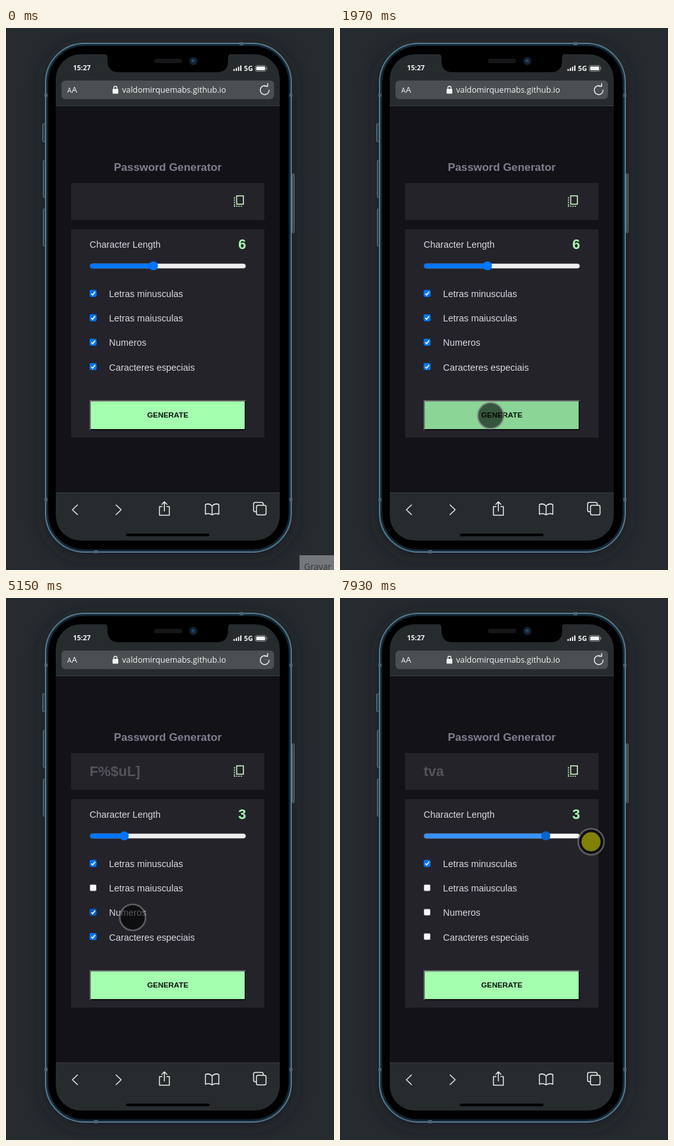
An HTML page that plays this animation: 514 by 846 pixels, repeating every 8 s.

```html
<!DOCTYPE html>
<html lang="pt">
<head>
<meta charset="utf-8">
<title>Password Generator</title>
<style>
html, body { margin: 0; width: 100%; height: 100%; overflow: hidden; background: #262b2f; }
svg { display: block; }
.ui { font-family: "Open Sans", "Noto Sans", sans-serif; fill: #f4f5f5; }
.app { font-family: "Liberation Sans", Arial, sans-serif; font-size: 14.4px; fill: #d9d8df; }
.b { font-weight: 700; }
.big { font-size: 22px; }
.icon { fill: none; stroke: #e9ebec; stroke-width: 1.5; stroke-linecap: round; stroke-linejoin: round; }
</style>
</head>
<body>
<svg width="514" height="846" viewBox="0 0 514 846">
  <defs>
    <filter id="blur" x="-30%" y="-30%" width="160%" height="160%"><feGaussianBlur stdDeviation="14"/></filter>
    <clipPath id="screen"><rect x="78" y="41" width="351" height="759" rx="39"/></clipPath>
  </defs>

  <rect width="514" height="846" fill="#262b2f"/>
  <rect x="58" y="26" width="394" height="800" rx="64" fill="#15191c" opacity=".6" filter="url(#blur)"/>

  <g id="phone">
    <g fill="#2a3b46" stroke="#66808f">
      <rect x="57.5" y="149.5" width="4" height="28" rx="1"/>
      <rect x="58.5" y="206.5" width="3" height="58" rx="1"/>
      <rect x="58.5" y="282.5" width="3" height="58" rx="1"/>
      <rect x="448.5" y="227.5" width="3" height="92" rx="1"/>
    </g>
    <rect x="62" y="24" width="385" height="794" rx="61" fill="#172a37" stroke="#547a8f" stroke-width="2"/>
    <rect x="66" y="28" width="377" height="786" rx="57" stroke="#0b141b"/>
    <path d="M60 105h5M444 105h5M60 736h5M444 736h5M366 24.5h6M138 817.5h6" stroke="#4a6373" stroke-width="5"/>
    <g clip-path="url(#screen)">
      <rect x="78" y="41" width="351" height="759" fill="#262b2e"/>
      <rect x="78" y="121" width="351" height="604" fill="#131217"/>
      <path d="M78 121.5H429M78 725.5H429" stroke="#383c40"/>
      <path d="M154 40Q159 41 159 47V51Q159 69 177 69H330Q348 69 348 51V47Q348 41 353 40Z"/>
    </g>
    <rect x="232" y="48" width="44" height="7" rx="3.5" fill="#151618"/>
    <circle cx="293.5" cy="51.5" r="6.5" fill="#13202c"/>
    <circle cx="293.5" cy="51.5" r="3" fill="#1c3a56"/>
    <circle cx="292.5" cy="50.5" r="1" fill="#3f6e96"/>
  </g>

  <g class="ui">
    <text class="b" x="105" y="66" font-size="10.8">15:27</text>
    <text class="b" x="373" y="66.5" font-size="10.8">5G</text>
    <path d="M357.5 67v-3M361 67v-4.500M364.5 67v-6.500M368 67v-8.500" stroke="#f4f5f5" stroke-width="2"/>
    <rect x="390.5" y="58.5" width="17" height="9" rx="2.5" fill="none" stroke="#8f9396"/>
    <rect x="392" y="60" width="14" height="6" rx="1.5"/>
    <path d="M409 61.5v3" stroke="#8f9396"/>

    <rect x="87" y="82" width="333" height="29" rx="6" fill="#4a4f52"/>
    <text x="96" y="101" font-size="10.5">A</text><text x="103" y="101" font-size="13.5">A</text>
    <rect x="167" y="95" width="9" height="7.5" rx="1.2"/>
    <path d="M169 95V93.5a2.5 2.5 0 0 1 5 0V95" fill="none" stroke="#f4f5f5" stroke-width="1.3"/>
    <text x="182" y="101" font-size="12.7">valdomirquemabs.github.io</text>
  </g>

  <g class="icon">
    <path d="M409.5 91.3A7 7 0 1 0 412.4 97M405.5 90.8H410V86.8"/>
    <path d="M112 744.5l-8 7.5l8 7.5M172.500 744.5l8 7.5l-8 7.5"/>
    <path d="M244.5 747H240.5V760.5H256V747H252M248.2 754V740M244.2 743.5l4-4l4 4"/>
    <path d="M323 746Q318 741 312.5 744V759Q318 756.5 323 760Q328 756.5 333.5 759V744Q328 741 323 746V760"/>
    <path d="M392 755H390.5Q388 755 388 752.5V743Q388 740.5 390.5 740.5H400.5Q403 740.5 403 743V744.5"/>
    <rect x="392.5" y="745" width="15" height="15" rx="2.5"/>
  </g>
  <path d="M190 791.3H317" stroke="#000" stroke-width="4" stroke-linecap="round"/>

  <g class="app">
    <text class="b" x="253.5" y="223" text-anchor="middle" font-size="17.3" fill="#817d92">Password Generator</text>
    <rect x="102" y="242" width="303" height="57.5" fill="#24232a"/>
    <rect x="102" y="314" width="303" height="325.5" fill="#24232a"/>
    <text class="b big" id="pass" x="131" y="278" fill="#54535a"></text>
    <g fill="none" stroke="#c9f0bf" stroke-width="1.6">
      <rect x="361.5" y="262" width="10.5" height="13"/>
      <path d="M358 264V279M357 278.3H370" stroke-dasharray="2 1.6"/>
    </g>
    <text x="131" y="343">Character Length</text>
    <text class="b big" id="count" x="364" y="345" fill="#a4ffaf"></text>

    <rect x="132" y="368" width="243.5" height="7" rx="3.5" id="track" stroke="#c4c4c6" stroke-width=".5"/>
    <rect x="131.5" y="367.7" height="7.6" rx="3.8" id="fill"/>
    <circle id="thumb" cy="371.3" r="7"/>

    <g id="rows"></g>

    <rect id="btn" x="131" y="581" width="245" height="47"/>
    <path id="edgeA" d="M131 628V581H376l-2 2H133V626Z"/>
    <path id="edgeB" d="M376 581V628H131l2-2H374V583Z"/>
    <text class="b" x="253.5" y="608" text-anchor="middle" font-size="11.8" fill="#08110a">GENERATE</text>
  </g>

  <g id="tip" class="ui">
    <rect x="460" y="823" width="54" height="23" fill="#74787b"/>
    <text x="467" y="846" font-size="13.7" fill="#32383b">Gravar</text>
  </g>

  <g id="cursor">
    <circle r="20" fill-opacity=".6"/>
    <circle r="20.2" fill="none" stroke="#85858a" stroke-opacity=".62" stroke-width="2.6"/>
    <circle id="dot" r="15" fill="#ff0" fill-opacity=".48"/>
  </g>
</svg>
<script>
const LOOP = 8000;
const $ = id => document.getElementById(id);
const set = (el, attrs) => { for (const k in attrs) el.setAttribute(k, attrs[k]); };

// Bursts of screen updates: start, end, number of updates
const bursts = [
  [70, 870, 12], [940, 1700, 12], [1770, 1970, 4], [2170, 2910, 12], [2980, 3790, 12],
  [3930, 4130, 4], [4270, 4410, 3], [4550, 4880, 5], [5150, 5150, 1],
  [5280, 5560, 5], [5700, 6050, 6], [6400, 6530, 2], [6790, 6910, 2], [7180, 7930, 12]
];
const ticks = bursts.flatMap(([a, b, n]) =>
  Array.from({ length: n }, (_, i) => n > 1 ? a + (b - a) * i / (n - 1) : a));

// Pointer gestures, each stop as [time, x, y]
const enter = [[70, 500, 868], [300, 462, 745], [600, 395, 490], [870, 346, 342],
  [1080, 338, 293], [1250, 336, 292], [1493, 328.5, 335.5]];
const toButton = [[1635, 290, 480], [1700, 258, 568], [1840, 238, 602], [1970, 236, 605], [2300, 236, 605]];
const dragLeft = [[2573, 189.5, 478.5], [2840, 222, 384], [2910, 230, 377], [3050, 230, 377],
  [3500, 206, 380], [3660, 195, 380.5], [3730, 187.5, 380.5], [3930, 185, 383]];
const uncheck = [[4130, 182, 457], [4632, 183.5, 456], [4880, 198, 503], [5150, 198.5, 498.5],
  [5350, 198.5, 498.5], [5560, 206, 532], [5770, 206, 532]];
const again = [[6050, 221.5, 593.5], [6530, 223.5, 594], [6910, 223.5, 595.5]];
const dragRight = [[7180, 222, 580], [7460, 186, 382], [7600, 185, 379], [7730, 222, 379],
  [7862, 322, 380], [7930, 393.5, 380.5]];
const path = [enter, toButton, dragLeft, uncheck, again, dragRight].flat();

const presses = [[2170, 2300], [2980, 3925], [4550, 4625], [5280, 5345], [5700, 5765], [6400, 6525], [7520, LOOP]];
const rows = [
  ['Letras minusculas', Infinity], ['Letras maiusculas', 4625],
  ['Numeros', 5345], ['Caracteres especiais', 5765]
];
const rowY = i => 414.2 + i * 38.1;

$('rows').innerHTML = rows.map(([label], i) => `
  <g transform="translate(131.5 ${rowY(i)})">
    <rect y="-5" width="10" height="10" rx="1.8"/>
    <path d="M2.2 .3l2 2.2l4-5" fill="none" stroke="#fff" stroke-width="1.7"/>
    <text x="30" y="6">${label}</text>
  </g>`).join('');
const boxes = $('rows').querySelectorAll('rect');
const marks = $('rows').querySelectorAll('path');

function snap(t) {
  let s = 0;
  for (const k of ticks) if (k <= t + 15) s = k;
  return s;
}

function pointer(t) {
  const i = path.findIndex(p => p[0] > t);
  if (i < 0) return path[path.length - 1].slice(1);
  if (i === 0) return path[0].slice(1);
  const [a, b] = [path[i - 1], path[i]];
  const k = (t - a[0]) / (b[0] - a[0]);
  return [a[1] + (b[1] - a[1]) * k, a[2] + (b[2] - a[2]) * k];
}

function draw(time) {
  const t = snap(time);
  const [x, y] = pointer(t);
  const down = presses.some(([a, b]) => t >= a && t < b);
  const inX = x > 131 && x < 376;

  set($('cursor'), { transform: `translate(${x} ${y})`, visibility: t < 70 ? 'hidden' : 'visible' });
  set($('dot'), { visibility: down ? 'visible' : 'hidden' });
  set($('tip'), { opacity: t < 70 ? 1 : Math.max(0, 1 - t / 220) });
  $('pass').textContent = t < 2300 ? '' : t < 6525 ? 'F%$uL]' : 'tva';
  $('count').textContent = t < 3925 ? 6 : 3;

  // The slider trails the pointer by one update while dragged
  const drag = down && (t >= 2980 && t < 4000 || t > 7500);
  const value = drag ? Math.round((pointer(t - 68)[0] - 139.5) / 15.25) : t < 2980 ? 6 : 3;
  const thumbX = 139.5 + value * 15.25;
  const over = inX && y > 362 && y < 385;
  const blue = drag ? '#3793ff' : over ? '#005cc8' : '#0075ff';
  set($('track'), { fill: drag ? '#f8f8f8' : over ? '#e5e5e5' : '#efefef' });
  set($('fill'), { width: thumbX - 131.5, fill: blue });
  set($('thumb'), { cx: thumbX, fill: drag && !inX ? '#0a63ce' : blue });

  rows.forEach(([, off], i) => {
    const on = t < off;
    const hot = x > 131 && x < 300 && Math.abs(y - rowY(i)) < 19;
    const tone = hot ? '#005cc8' : '#0075ff';
    set(boxes[i], { fill: on ? tone : '#fff', stroke: on ? tone : '#767676' });
    set(marks[i], { visibility: on ? 'visible' : 'hidden' });
  });

  const hot = inX && y > 581 && y < 628;
  const edges = ['#6c706d', '#0d0f0e'];
  if (hot && down) edges.reverse();
  set($('btn'), { fill: hot ? '#8bd597' : '#a4ffaf' });
  set($('edgeA'), { fill: edges[0] });
  set($('edgeB'), { fill: edges[1] });
}

const start = performance.now();
function loop() {
  draw((performance.now() - start) % LOOP);
  requestAnimationFrame(loop);
}
loop();
</script>
</body>
</html>
```
